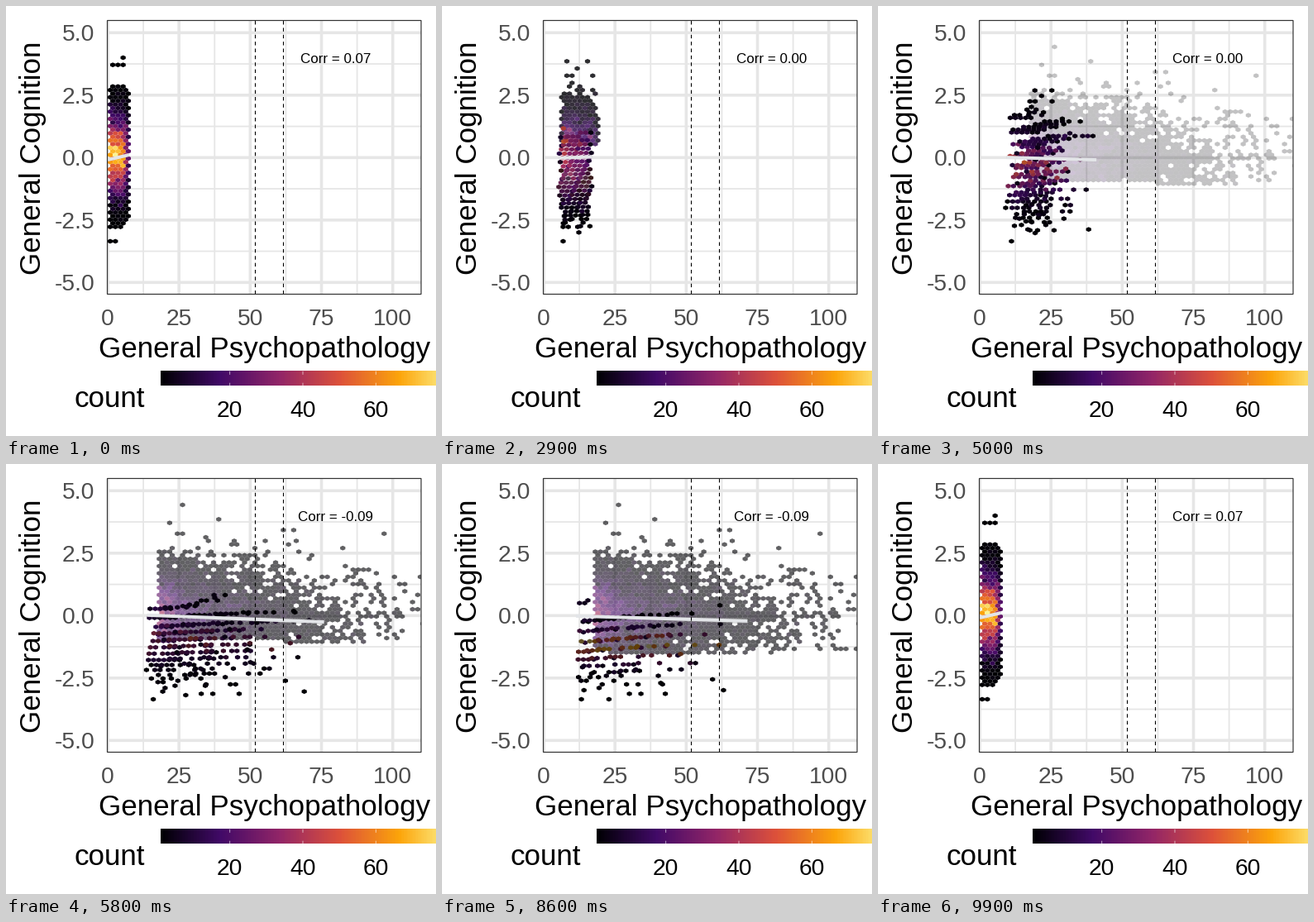
These frames come from a looping animation (520x520 px, 10 s). A matplotlib script:

```python
import numpy as np
import matplotlib.pyplot as plt
from matplotlib.animation import FuncAnimation
from matplotlib.collections import PolyCollection
from matplotlib.colors import LinearSegmentedColormap
from matplotlib.patches import Polygon, Rectangle

plt.rcParams["font.family"] = "Liberation Sans"
plt.rcParams["path.snap"] = False
DPI = 100
SIZE = 520
LEFT, RIGHT, TOP, BOTTOM = 122.5, 502, 17.5, 348.5
MAX_COUNT = 83
FIRE = LinearSegmentedColormap.from_list("fire", [
    "#000004", "#420A68", "#932667", "#DD513A", "#FCA50A", "#FCFFA4"])

# Hexagon lattice, in pixels, counted from the lowest row up
X0, Y0, DX, DY = 126, 284.5, 6.25, 4.353
ROWS, COLS = 55, 61
HEX = np.array([(1, 1), (1, -1), (0, -2), (-1, -1), (-1, 1), (0, 2)])
HEX = HEX * (DX / 2, 0.332 * DY)


def px(v):
    return 123 + 3.447 * v


def py(v):
    return 183.3 - 30.2 * v


def pt(pixels):
    return pixels * 72 / DPI


def bell(y, sd):
    return np.exp(-0.5 * (y / sd) ** 2)


# Expected count per cell: x in pixels, y in data units
def low(x, y):
    side = np.clip((151 - x) / 10, 0, 1)
    return 66 * side * bell(y - 0.1, 0.92)


def middle(x, y):
    edge = np.clip((x - 144) / 3, 0, 1) * np.clip((190 - x) / 6, 0, 1)
    return 43 * edge * np.exp((148 - x) / 70) * bell(y, 0.96)


def high(x, y):
    d = np.maximum(x - 185, 0)
    y = y - 0.05 + 0.0007 * d
    core = 20 * np.exp(-d / 28) * bell(y, 0.75)
    body = 10 * np.exp(-(d / 120) ** 1.5) * bell(y, 1.07)
    tail = 0.3 * np.exp(-d / 140) * bell(y, 1.4)
    return (x > 184) * (core + body + tail)


def hexbin(rate, sure, seed, extremes):
    """Filled cells, row by row from the bottom: centres and colours."""
    r, k = np.mgrid[:ROWS, :COLS]
    x, y = X0 + DX * (k + r % 2 / 2), Y0 - DY * r
    mean = rate(x, (183.3 - y) / 30.2)
    count = np.random.RandomState(seed).poisson(mean)
    count = np.maximum(count, mean > sure)
    for ex, ey in extremes:
        near = np.argmin((x - ex) ** 2 + (y - ey) ** 2)
        count.flat[near] = 1
    filled = count > 0
    level = (count[filled] - 1) / (MAX_COUNT - 1)
    return np.column_stack([x[filled], y[filled]]), FIRE(np.clip(level, 0, 1))


STATES = [hexbin(low, 0.5, 3, [(141, 62), (141, 71), (126, 284), (132, 284)]),
          hexbin(middle, 1.5, 5, [(179, 66), (160, 84), (151, 284)]),
          hexbin(high, 4, 8, [(214, 49), (198, 71), (338, 80), (497, 158),
                              (246, 284)])]
LABELS = ["Corr = 0.07", "Corr = 0.00", "Corr = -0.09"]
# Fit: x start, x end, y start, y end, half width of the band at each end
FITS = np.array([(123, 149, 186, 180, 1.5, 1.5),
                 (146, 189, 183.3, 183, 1.5, 1.5),
                 (186, 505, 182.5, 196, 1, 4.5)])
MOVES = [(11, 22), (45, 21), (78, 21)]  # start, steps

fig = plt.figure(figsize=(SIZE / DPI, SIZE / DPI), dpi=DPI, facecolor="white")
ax = fig.add_axes((0, 0, 1, 1))
ax.axis("off")

panel = Rectangle((LEFT, TOP), RIGHT - LEFT, BOTTOM - TOP, fill=False,
                  ec="#333333", lw=pt(1.2), zorder=8)
ax.add_patch(panel)


def vline(x, **kw):
    ax.plot([x, x], [BOTTOM, TOP], **kw)[0].set_clip_path(panel)


def hline(y, **kw):
    ax.plot([LEFT, RIGHT], [y, y], **kw)[0].set_clip_path(panel)


def text(x, y, s, size, color="black", ha="center", **kw):
    return ax.text(x, y, s, fontsize=pt(size), color=color, ha=ha,
                   va="baseline", **kw)


minor = dict(color="#E6E6E6", lw=pt(1.8), zorder=1)
major = dict(color="#E6E6E6", lw=pt(3.6), zorder=1)
for v in range(0, 101, 25):
    vline(px(v), **major)
    vline(px(v + 12.5), **minor)
    text(px(v), 385.5, str(v), 28.3, "#4D4D4D")
for v in np.arange(-5, 5.1, 2.5):
    hline(py(v), **major)
    hline(py(v + 1.25), **minor)
    text(107, py(v) + 10, f"{v:.1f}", 28.3, "#4D4D4D", ha="right")
for x in (301.5, 335.5):
    vline(x, color="black", lw=pt(1.1), dashes=(4, 3.6), zorder=6,
          dash_capstyle="butt")

text(312.3, 425, "General Psychopathology", 35)
text(42, 183.5, "General Cognition", 35, rotation=90, rotation_mode="anchor")
corr = text(398.7, 69, LABELS[0], 17, zorder=7)

# Colour bar, running off the right edge
text(83, 485, "count", 35, ha="left")
ax.imshow(np.linspace(0, 1, 256)[None], cmap=FIRE, aspect="auto",
          extent=(187, 549, 459.5, 442), zorder=2)
for n in (20, 40, 60):
    x = 187 + 4.41 * (n - 1)
    for y in (442, 456):
        ax.plot([x, x], [y, y + 3.5], color="white", lw=pt(0.6), zorder=3)
    text(x, 497, str(n), 28.3)

hexes = PolyCollection([HEX], edgecolors="none", linewidths=0, zorder=3)
band = Polygon(np.zeros((4, 2)), fc="#999999", alpha=0.4, lw=0, zorder=4)
ax.add_collection(hexes)
ax.add_patch(band)
fit, = ax.plot([], [], color="#E3E5E8", lw=pt(4), zorder=5,
               solid_capstyle="butt")
for item in (hexes, band, fit):
    item.set_clip_path(panel)
ax.set_xlim(0, SIZE)
ax.set_ylim(SIZE, 0)


def pose(f):
    for i, (start, steps) in enumerate(MOVES):
        if f <= start:
            return i, 0
        if f < start + steps:
            return i, (f - start) / steps
    return 0, 0


def mix(a, b, t):
    return a + (b - a) * t


def draw(f):
    i, t = pose(f)
    j = (i + 1) % 3
    (xy_a, col_a), (xy_b, col_b) = STATES[i], STATES[j]
    n = min(len(xy_a), len(xy_b))

    # Cells pair up by rank; the surplus fades in or out in place
    if len(xy_b) > n:
        rest, tint, alpha = xy_b[n:], col_b[n:].copy(), t
    else:
        rest, tint, alpha = xy_a[n:], col_a[n:].copy(), 1 - t
    tint[:, 3] = alpha
    xy = np.vstack([rest, mix(xy_a[:n], xy_b[:n], t)])
    hexes.set_verts(xy[:, None] + HEX)
    hexes.set_facecolor(np.vstack([tint, mix(col_a[:n], col_b[:n], t)]))

    x0, x1, y0, y1, w0, w1 = mix(FITS[i], FITS[j], t)
    fit.set_data([x0, x1], [y0, y1])
    band.set_xy([(x0, y0 - w0), (x1, y1 - w1), (x1, y1 + w1), (x0, y0 + w0)])
    corr.set_text(LABELS[i if t < 0.5 else j])
    return hexes, band, fit, corr


anim = FuncAnimation(fig, draw, frames=100, interval=100, repeat=True,
                     repeat_delay=0, init_func=lambda: draw(0))
plt.show()
```
